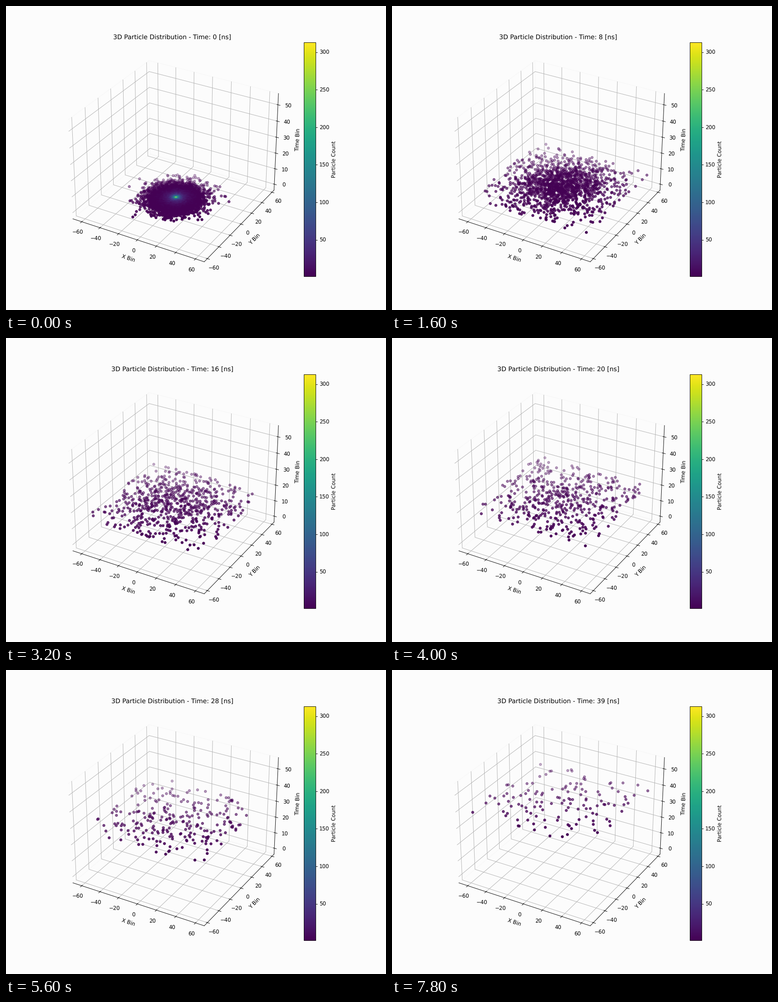
A matplotlib script for the animation above (8000 ms loop, 837 by 669 pixels).

```python
import matplotlib.pyplot as plt
import numpy as np
from matplotlib.animation import FuncAnimation
from matplotlib.cm import ScalarMappable
from matplotlib.colors import Normalize

FRAMES = 40
STEP_MS = 200
X_RANGE = (-61, 60)
Y_RANGE = (-57, 56)
Z_RANGE = (0, 53)
BACKGROUND = "#fcfcfc"
CMAP = "viridis"
NORM = Normalize(1, 313)

plt.rcParams["text.hinting"] = "none"


def padded(low, high):
    """Axis limits with a 5 % data margin and a 1/48 view margin."""
    pad = (high - low) * (0.05 + 1.1 / 48)
    return low - pad, high + pad


def prompt_hits(rng):
    """Sharp central burst with a wide halo, as counts per bin."""
    x, y = np.meshgrid(np.arange(X_RANGE[0], X_RANGE[1] + 1),
                       np.arange(Y_RANGE[0], Y_RANGE[1] + 1))
    r = np.hypot(x, y)
    rate = 255 * np.exp(-r / 1.8) + 55 * np.exp(-(r / 8) ** 1.5) + 2.8 * np.exp(-(r / 18) ** 2)
    count = rng.poisson(rate)
    count[r == 0] = NORM.vmax
    hit = count > 0
    return x[hit], y[hit], count[hit]


def late_hits(t, rng):
    """Decaying cloud that spreads towards an even cover of the rectangle."""
    total = int(70 + 1300 * np.exp(-(t - 8) / 10) + 1800 * np.exp(-(t - 1) / 2.5))
    core = rng.random(total * 6) < 0.55 * np.exp(-t / 10)
    sigma = np.where(core, 8 + 0.9 * t, 22 + 0.8 * t)
    x, y = np.rint(rng.normal(size=(2, total * 6)) * sigma).astype(int)
    inside = (x >= X_RANGE[0]) & (x <= X_RANGE[1]) & (y >= Y_RANGE[0]) & (y <= Y_RANGE[1])
    xy = np.column_stack([x, y])[inside][:total]
    bins, count = np.unique(xy, axis=0, return_counts=True)
    return bins[:, 0], bins[:, 1], count


def hits(t):
    rng = np.random.default_rng(100 + t)
    return late_hits(t, rng) if t else prompt_hits(rng)


fig = plt.figure(figsize=(10, 7.993), dpi=83.7, facecolor=BACKGROUND)
ax = fig.add_subplot(projection="3d", facecolor=BACKGROUND)
ax.set_xlim(*padded(*X_RANGE))
ax.set_ylim(*padded(*Y_RANGE))
ax.set_zlim(*padded(*Z_RANGE))
ax.set_xlabel("X Bin")
ax.set_ylabel("Y Bin")
ax.set_zlabel("Time Bin")
for axis in (ax.xaxis, ax.yaxis, ax.zaxis):
    axis.pane.set_facecolor(BACKGROUND)
    axis.pane.set_edgecolor("#f3f3f3")
fig.colorbar(ScalarMappable(NORM, CMAP), ax=ax, label="Particle Count")

cloud = None


def draw(t):
    global cloud
    if cloud is not None:
        cloud.remove()
    x, y, count = hits(t)
    cloud = ax.scatter(x, y, np.full(len(x), t), c=count, cmap=CMAP, norm=NORM)
    ax.set_title(f"3D Particle Distribution - Time: {t} [ns]")
    return [cloud]


anim = FuncAnimation(fig, draw, frames=FRAMES, init_func=lambda: draw(0),
                     interval=STEP_MS, repeat=True, repeat_delay=0, blit=False)
plt.show()
```
